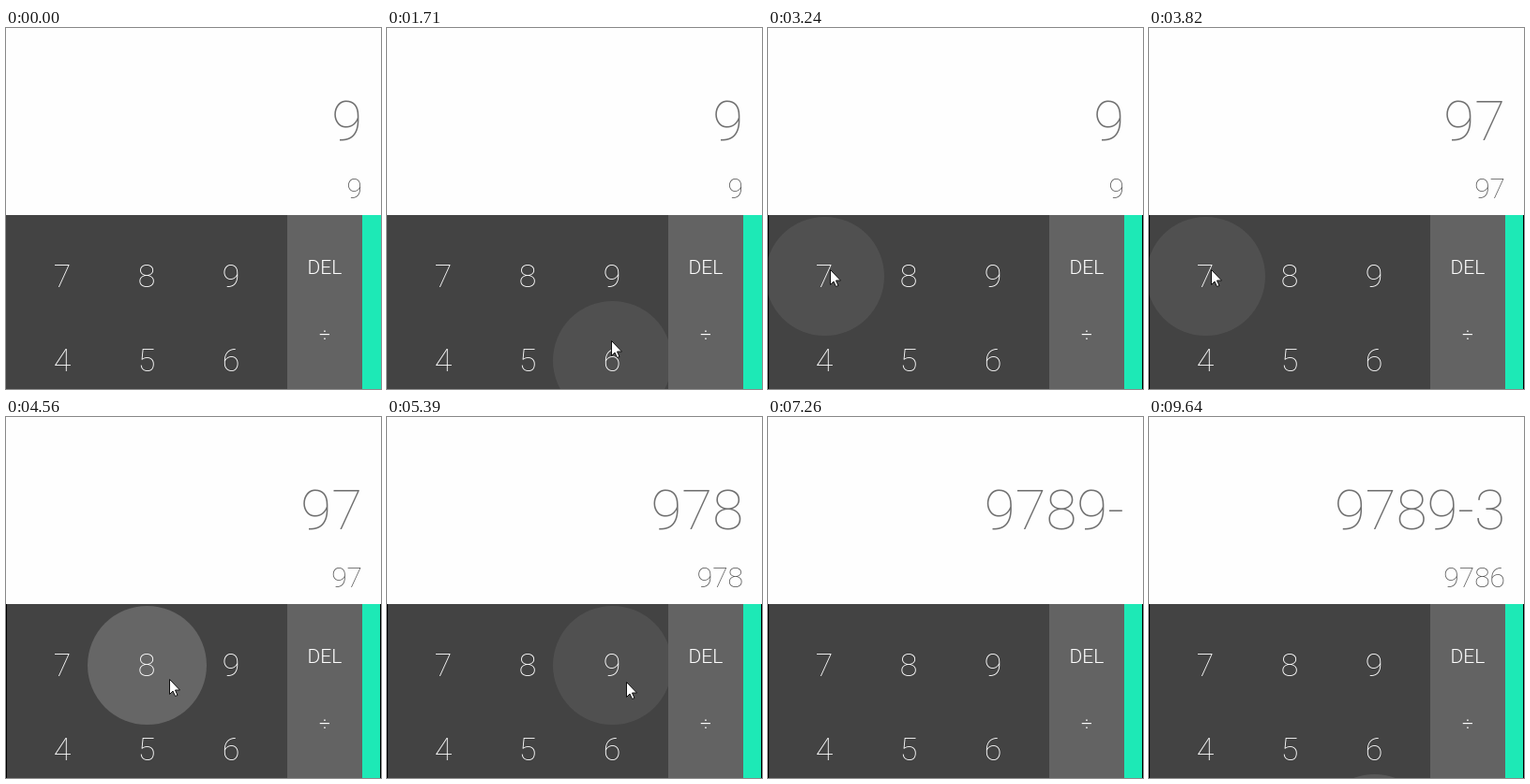
An HTML page that plays this animation: 400x386 px, repeating every 9.74 s.

```html
<!DOCTYPE html>
<html lang="en">
<head>
<meta charset="utf-8">
<title>Calculator</title>
<style>
  html, body { margin: 0; width: 100%; height: 100%; overflow: hidden; background: #fefefe; }
  svg { display: block; width: 400px; height: 386px; }
  text { font-family: Roboto, sans-serif; font-weight: 100; fill: #fff; text-anchor: middle; }
  .display text { text-anchor: end; }
  #entry { font-size: 60px; fill: #707070; }
  #result { font-size: 30px; fill: #555; }
  #keys { font-size: 34px; }
  .ops text { font-size: 21px; font-weight: 300; }
</style>
</head>
<body>
<svg viewBox="0 0 400 386">
  <g class="display">
    <text id="entry" x="380" y="120"></text>
    <text id="result" x="380" y="182"></text>
  </g>
  <rect y="200" width="300" height="186" fill="#434343"/>
  <rect class="edge" y="200" width="1" height="186"/>
  <circle id="glow" r="63.5" fill="#fff"/>
  <g id="keys"></g>
  <g class="ops">
    <rect x="300" y="200" width="80" height="186" fill="#636363"/>
    <text x="340" y="263">DEL</text>
    <text x="340" y="335">÷</text>
  </g>
  <rect x="380" y="200" width="20" height="186" fill="#1de9b6"/>
  <rect class="edge" x="399" y="200" width="1" height="186"/>
  <path id="cursor" d="M.5 .5V16.5L4 13l2.5 5.5 2.5-1L6.5 12H11.5Z" fill="#fff" stroke="#111"/>
</svg>
<script>
const LOOP = 9740, EDGES_AT = 2620, PRESS_RAMP = 240;
const KEY = 90, KEYS_LEFT = 15, KEYS_TOP = 220;
const $ = id => document.getElementById(id);

// start, end and destination of each pointer move
const moves = [
  [1150, 1710, 239, 334], [1710, 1980, 199, 292], [2130, 2480, 162, 277],
  [2620, 3240, 66, 258], [3820, 4080, 174, 280], [4790, 4870, 255, 283],
  [6240, 6600, 220, 500], [8250, 8300, 240, 440]
];
// press, release, key
const presses = [
  [3390, 3570, '7'], [4320, 4590, '8'], [5390, 5680, '9'],
  [7180, 7260, '-'], [8300, 8360, '3'], [9610, LOOP, '3']
];

['789', '456'].forEach((row, r) => [...row].forEach((digit, c) => {
  const key = document.createElementNS('http://www.w3.org/2000/svg', 'text');
  key.setAttribute('x', 60 + c * KEY);
  key.setAttribute('y', 277 + r * KEY);
  key.textContent = digit;
  $('keys').append(key);
}));

const progress = (t, start, end) => Math.max(0, Math.min(1, (t - start) / (end - start)));

function pointerAt(t) {
  return moves.reduce(([x, y], [start, end, toX, toY]) => {
    const k = progress(t, start, end);
    return [x + (toX - x) * k, y + (toY - y) * k];
  }, [367, 386]);
}

function glowOpacity(t) {
  const press = presses.find(([down, up]) => t >= down && t < up);
  const p = press ? progress(t, press[0], press[0] + PRESS_RAMP) : 0;
  return 0.07 + 0.116 * (1 - (1 - p) ** 3);
}

function evaluate(entry) {
  const [a, b] = entry.split('-');
  return b === undefined ? a : b && a - b;
}

function draw(t) {
  const [x, y] = pointerAt(t);
  const col = Math.floor((x - KEYS_LEFT) / KEY), row = Math.floor((y - KEYS_TOP) / KEY);
  const hovering = col >= 0 && col < 3 && row >= 0 && row < 3;
  $('cursor').setAttribute('transform', `translate(${Math.round(x)} ${Math.round(y)})`);
  $('glow').setAttribute('cx', 60.5 + col * KEY);
  $('glow').setAttribute('cy', 265.5 + row * KEY);
  $('glow').setAttribute('opacity', hovering ? glowOpacity(t) : 0);

  const typed = presses.filter(([, up]) => up <= t).map(([, , key]) => key);
  const entry = '9' + typed.join('');
  $('entry').textContent = entry;
  $('result').textContent = evaluate(entry);
  document.querySelectorAll('.edge').forEach(e => e.setAttribute('opacity', t < EDGES_AT ? 0 : 1));
}

const start = performance.now();
function tick() {
  draw((performance.now() - start) % LOOP);
  requestAnimationFrame(tick);
}
tick();
</script>
</body>
</html>
```
